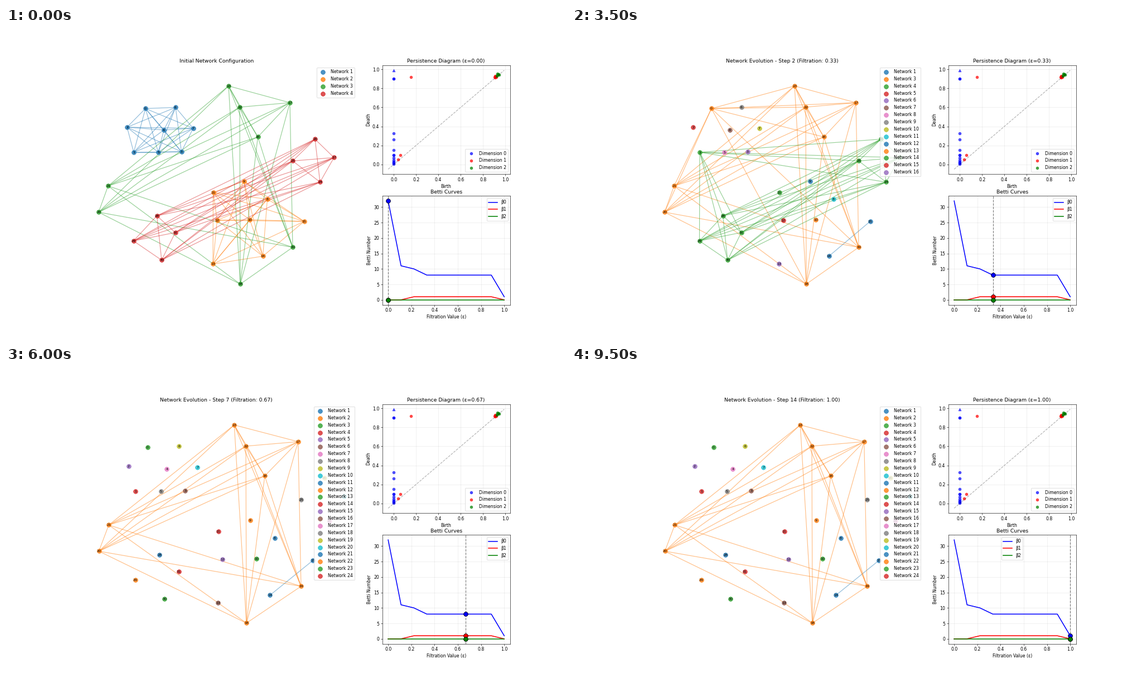
A matplotlib script for the animation above (10 s loop, 1004 by 558 pixels).

```python
from itertools import combinations

import matplotlib.pyplot as plt
import numpy as np
from matplotlib.animation import FuncAnimation
from matplotlib.collections import LineCollection

W, H, DPI = 1004, 558, 55.8
FRAMES, INTERVAL = 20, 500

# Node centres in stage pixels, y pointing down.
NODES = np.array([
    (250, 144.5), (229, 223), (217, 178), (314.5, 222), (283, 183),
    (273, 223), (304, 142.5), (335.5, 180), (468.5, 307), (426.5, 275),
    (437, 344), (371.5, 295), (378.5, 345), (371, 423.5), (460.5, 409.5),
    (534.5, 347), (451.5, 195.5), (509, 134), (420, 459.5), (514, 393.5),
    (166, 330.5), (183, 283.5), (419, 142), (399, 104), (563, 276.5),
    (514, 238.5), (554, 199.5), (588, 232.5), (270.5, 337), (228.5, 382),
    (279, 416.5), (303.5, 367),
])
COLORS = plt.get_cmap("tab10").colors

EPS = np.linspace(0, 1, 10)
BETTI = [
    ("β0", "blue", [32, 11, 10] + [8] * 6 + [1]),
    ("β1", "red", [0, 0] + [1] * 7 + [0]),
    ("β2", "green", [0] * 10),
]

DEATHS = [0.9, 0.9, 0.325, 0.26, 0.152, 0.1, 0.1, 0.07, 0.045,
          0.03, 0.02, 0.012, 0.003]
LOOPS = [(0.155, 0.92), (0.04, 0.05), (0.06, 0.1), (0.904, 0.92),
         (0.909, 0.91), (0.913, 0.925), (0.909, 0.932), (0.92, 0.918)]
VOIDS = [(0.924, 0.93), (0.928, 0.955), (0.93, 0.94), (0.938, 0.947),
         (0.944, 0.942)]

fig = plt.figure(figsize=((W + 0.01) / DPI, (H + 0.01) / DPI), dpi=DPI,
                 facecolor="white")
grid = fig.add_gridspec(2, 3)
net_ax = fig.add_subplot(grid[:, :2])
pers_ax = fig.add_subplot(grid[0, 2])
betti_ax = fig.add_subplot(grid[1, 2])


def networks(step):
    """Members of each numbered network after the given step."""
    if step == 0:
        return {k + 1: list(range(8 * k, 8 * k + 8)) for k in range(4)}
    third, fourth = list(range(16, 24)), list(range(24, 32))
    singles = {n + 3: [n] for n in range(2, 8)}
    if step == 1:
        return {2: list(range(8, 16)), 3: [0] + third, 4: [1] + fourth,
                **singles}
    singles.update({n + 3: [n] for n in range(8, 14)})
    if step == 2:
        return {1: [14, 15], 3: [0] + third, 4: [1] + fourth, **singles}
    if step == 3:
        return {1: [14, 15], 2: third, 3: [0], 4: [1] + fourth, **singles}
    singles.update({n - 7: [n] for n in fourth})
    return {1: [14, 15], 2: third, 3: [0], 4: [1], **singles}


def draw_network(step, eps):
    ax = net_ax
    ax.clear()
    ax.axis("off")
    box = ax.get_position()
    ax.set_xlim(box.x0 * W, box.x1 * W)
    ax.set_ylim((1 - box.y0) * H, (1 - box.y1) * H)

    pos = NODES.copy()
    if step >= 4:
        pos[:, 0] = 166.5 + (pos[:, 0] - 166) * 1.0415

    for i, (number, members) in enumerate(networks(step).items()):
        color = COLORS[i % 10]
        edges = [pos[list(pair)] for pair in combinations(members, 2)]
        ax.add_collection(LineCollection(edges, colors=[color], linewidths=1.5,
                                         alpha=0.5, zorder=1), autolim=False)
        ax.scatter(*pos[members].T, s=100, color=[color], alpha=0.8, zorder=2,
                   label=f"Network {number}")
    for n, (x, y) in enumerate(pos):
        ax.text(x, y, str(n), fontsize=8, ha="center", va="center", zorder=3)

    ax.legend(loc="upper right")
    if step:
        ax.set_title(f"Network Evolution - Step {step} (Filtration: {eps:.2f})")
    else:
        ax.set_title("Initial Network Configuration")


def draw_persistence():
    ax = pers_ax
    ax.plot([-0.05, 0.99], [-0.05, 0.99], "k--", alpha=0.3)
    groups = [([(0, d) for d in DEATHS], "blue"), (LOOPS, "red"),
              (VOIDS, "green")]
    for dim, (points, color) in enumerate(groups):
        ax.scatter(*zip(*points), color=color, alpha=0.7,
                   label=f"Dimension {dim}")
    ax.scatter([0], [0.99], color="blue", marker="^", alpha=0.7)
    ax.set(xlim=(-0.102, 1.042), ylim=(-0.102, 1.042),
           xlabel="Birth", ylabel="Death")
    ax.grid(alpha=0.3)
    ax.legend(loc="lower right")


def draw_betti(index):
    ax = betti_ax
    ax.clear()
    for name, color, values in BETTI:
        ax.plot(EPS, values, color=color, lw=2, label=name)
    ax.axvline(EPS[index], color="black", ls="--", alpha=0.5)
    for _, color, values in BETTI:
        ax.scatter(EPS[index], values[index], s=100, color=color,
                   edgecolor="black", zorder=5)
    ax.set(xlim=(-0.05, 1.05), ylim=(-1.6, 33.6), title="Betti Curves",
           xlabel="Filtration Value (ε)", ylabel="Betti Number")
    ax.grid(alpha=0.3)
    # The legend makes way once the marker line would cross it.
    ax.legend(loc="upper center" if index >= 8 else "upper right")


def update(frame):
    index = frame // 2
    step = max(0, frame - 5)
    draw_network(step, EPS[index])
    pers_ax.set_title(f"Persistence Diagram (ε={EPS[index]:.2f})")
    draw_betti(index)
    return []


draw_persistence()
anim = FuncAnimation(fig, update, frames=FRAMES, interval=INTERVAL,
                     init_func=lambda: update(0), repeat=True, repeat_delay=0,
                     blit=False)
plt.show()
```
